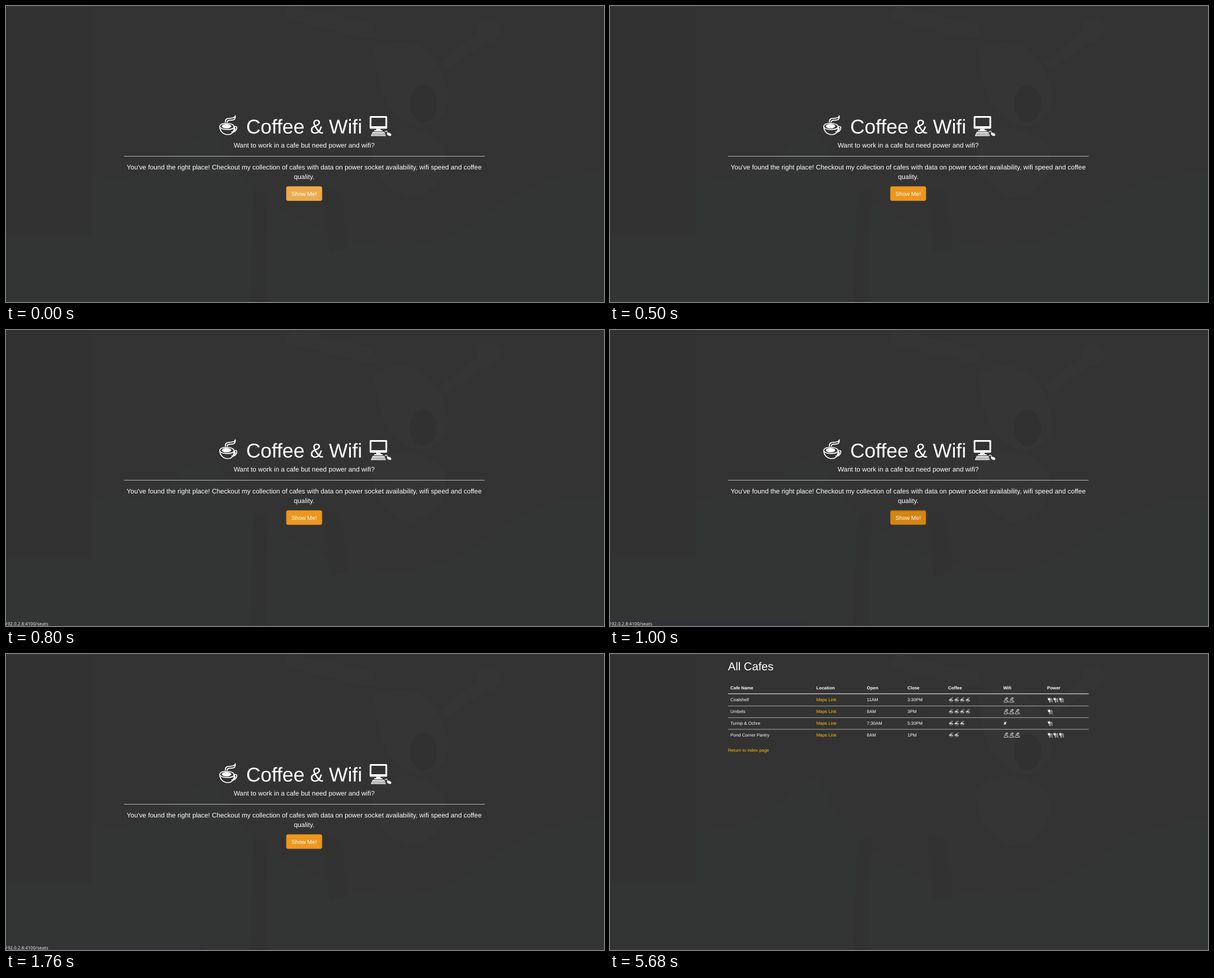
Write an HTML page that moves like this. It is 1063x527 px and loops after 8000 ms.

```html
<!DOCTYPE html>
<html lang="en">
<head>
<meta charset="utf-8">
<title>Cafes</title>
<style>
html, body { margin: 0; width: 100%; height: 100%; overflow: hidden; background: #333; }
svg { display: block; width: 1063px; height: 527px; }
text { font-family: "Liberation Sans", Arial, sans-serif; fill: #fff; text-rendering: geometricPrecision; }
.mid { text-anchor: middle; }
.lead { font-size: 11.81px; }
.cell { font-size: 7.875px; }
.head { font-weight: bold; }
.link { fill: #ffc107; }
.cross { font-family: "DejaVu Sans", sans-serif; }
#status text { font: 8px "Noto Sans", sans-serif; text-anchor: end; }
.line { fill: none; stroke: #fff; stroke-linecap: round; stroke-linejoin: round; }
</style>
</head>
<body>
<svg viewBox="0 0 1063 527">
  <defs>
    <g id="cup">
      <path class="line" stroke-width="1.7" d="M1 20C1 29 8 34.5 15 34.5C22 34.5 26 30 27 22C27 12 1 12 1 20C2 27 25 27 27 21"/>
      <ellipse cx="13" cy="19.5" rx="8.5" ry="4" fill="#fff"/>
      <path class="line" stroke-width="1.7" d="M25.5 21C31 18.5 32.5 21 30.5 25.5C28.5 29 25 31 22.5 29.5M26.5 23.5C30 22 28.5 27 25 27.5"/>
      <path class="line" stroke-width="1.8" d="M11 12C10.5 3 20 6.5 25 4.500C28 3.500 28.500 2 28.500 1C29.500 10 22 8.500 17.500 9C15 9.300 14.500 10 14 12"/>
    </g>
    <g id="pc">
      <path fill="#fff" fill-rule="evenodd" d="M2 0H30Q31.500 0 31.500 1.500V21Q31.500 22.500 30 22.500H2Q.5 22.500 .5 21V1.500Q.5 0 2 0ZM3.500 3V18H28.500V3Z"/>
      <path fill="#fff" d="M12 22.500H20V25H23.500V27H8.500V25H12ZM6 28H26.500L29.500 35.500H2.500Z"/>
      <path stroke="#333" stroke-width=".6" d="M6 30H27M5 32H28M4.500 33.700H29"/>
      <path class="line" stroke-width="1.200" d="M28 28C31 25 32 28 32 30"/>
      <ellipse cx="35" cy="32.500" rx="4" ry="2.400" transform="rotate(25 35 32.500)" fill="#fff"/>
    </g>
    <g id="arm">
      <path class="line" stroke-width=".75" d="M2.500 4.500C2 2 4 .5 6.300 .7C7.800 1 7.500 3 6 3.200L4.600 3.400C3.800 5 4 5.500 4 6C6 4.500 8.300 6 7.800 8.200M2.500 4.500C1 6.500 .3 8.300 1 9H5.500M5.500 7.200C6.300 8 7 8.600 8.500 8.800M4.500 2L6 1.700"/>
    </g>
    <g id="plug">
      <path fill="#fff" d="M.6 .4L1.400 .2L1.800 1.600L3.200 1.200L2.900 0L3.700 0L4.200 1.300C5.200 3 4.300 4.600 3.200 4.900L2.200 5C.8 4.500 .2 3 .5 1.800Z"/>
      <path class="line" stroke-width=".85" d="M2.800 5C3 7.500 3.300 8.700 4.300 8.500C5.700 8.200 4.600 2 6.500 1.700C8.800 1.500 7 6 8 8.500"/>
    </g>
  </defs>

  <rect width="1063" height="527" fill="#333"/>
  <g id="backdrop">
    <path fill="#323232" d="M0 0H154V408H0Z"/>
    <path fill="#333534" d="M0 408H154V300Q240 330 320 250L370 215Q400 330 560 400T850 375Q960 290 1063 300V527H0Z"/>
    <path fill="#353535" d="M495 12L510 0L650 32L660 55L640 58L500 24ZM770 102L838 48Q836 22 858 25Q884 25 879 46Q870 65 850 66L785 112ZM655 75Q740 40 775 120T735 215Q660 200 655 75ZM650 240Q720 190 780 250Q790 330 715 342Q650 320 650 240Z"/>
    <ellipse cx="742" cy="174" rx="24" ry="33" fill="#313131"/>
    <path fill="#323232" d="M440 330L465 325L460 527H432ZM565 320L595 330L610 430L575 440Z"/>
  </g>

  <g id="home">
    <use href="#cup" x="379" y="194.500"/>
    <text class="mid" x="530" y="227" font-size="35.440">Coffee &amp; Wifi</text>
    <use href="#pc" x="646" y="196"/>
    <text class="mid lead" x="530" y="252">Want to work in a cafe but need power and wifi?</text>
    <rect x="209.700" y="267" width="641" height=".7" fill="#eee"/>
    <text class="mid lead" x="530" y="291.300">You've found the right place! Checkout my collection of cafes with data on power socket availability, wifi speed and coffee</text>
    <text class="mid lead" x="530" y="308">quality.</text>
    <rect id="button" x="498.300" y="321.300" width="63.400" height="25.400" rx="3.200" stroke-width=".6"/>
    <path id="shade" d="M499 323.300Q499 322 501 322H559Q561 322 561 323.300Z" fill="#000" opacity=".1"/>
    <text class="mid" x="530" y="337.600" font-size="10.125">Show Me!</text>
    <rect id="bar" y="517" width="351" height="10" fill="#313338"/>
    <g id="status"><text x="75" y="526.300">192.0.2.8:4100/seats</text></g>
  </g>

  <g id="list">
    <text x="209.700" y="29.200" font-size="20.250">All Cafes</text>
    <g id="table"></g>
    <text class="cell link" x="209.700" y="173.800">Return to index page</text>
  </g>
</svg>
<script>
const $ = id => document.getElementById(id);
const columns = [214.1, 366.8, 456.6, 528.8, 601.1, 699, 777];
const heads = ["Cafe Name", "Location", "Open", "Close", "Coffee", "Wifi", "Power"];
// name, opening, closing, then ratings for coffee, wifi and power
const cafes = [
  ["Coalshelf", "11AM", "3:30PM", 4, 2, 3],
  ["Umbels", "8AM", "3PM", 4, 3, 1],
  ["Turnip & Ochre", "7:30AM", "5:30PM", 3, 0, 1],
  ["Pond Corner Pantry", "8AM", "1PM", 2, 3, 3]
];
const icons = [["cup", 0.235, 1.3, -7.2], ["arm", 1, 0.8, -7.4], ["plug", 1, 1, -6.8]];

const label = (value, col, y, kind = "") =>
  `<text class="cell ${kind}" x="${columns[col]}" y="${y}">${value.replace("&", "&amp;")}</text>`;

const rule = (y, height) =>
  `<rect x="209.7" y="${y}" width="641" height="${height}" fill="#ddd"/>`;

function rating(count, kind, y) {
  if (!count) return label("✘", kind + 4, y, "cross");
  const [id, scale, dx, dy] = icons[kind];
  return Array.from({ length: count }, (_, i) =>
    `<use href="#${id}" transform="translate(${columns[kind + 4] + dx + i * 10} ${y + dy}) scale(${scale})"/>`
  ).join("");
}

let rows = heads.map((head, i) => label(head, i, 63.1, "head")).join("") + rule(70.2, 1.2);
cafes.forEach(([name, open, close, ...scores], i) => {
  const y = 84.4 + i * 20.83;
  if (i) rows += rule(y - 13.2, 0.7);
  rows += label(name, 0, y) + label("Maps Link", 1, y, "link") + label(open, 2, y) + label(close, 3, y);
  rows += scores.map((score, kind) => rating(score, kind, y)).join("");
});
$("table").innerHTML = rows;

const show = (id, on) => $(id).style.display = on ? "" : "none";

function draw() {
  const t = performance.now() % 8000;
  const pressed = t >= 1000 && t < 1100;
  const [fill, edge] = t < 500 ? ["#edab4d", "#eea236"]
    : pressed ? ["#d58512", "#985f0d"] : ["#ec971f", "#d58512"];
  show("home", t < 2200);
  show("list", t >= 2200);
  $("button").setAttribute("fill", fill);
  $("button").setAttribute("stroke", edge);
  show("shade", pressed);
  show("status", t >= 700);
  $("status").style.opacity = t < 800 ? 0.4 : 0.9;
  show("bar", t >= 1000);
  requestAnimationFrame(draw);
}
draw();
</script>
</body>
</html>
```
